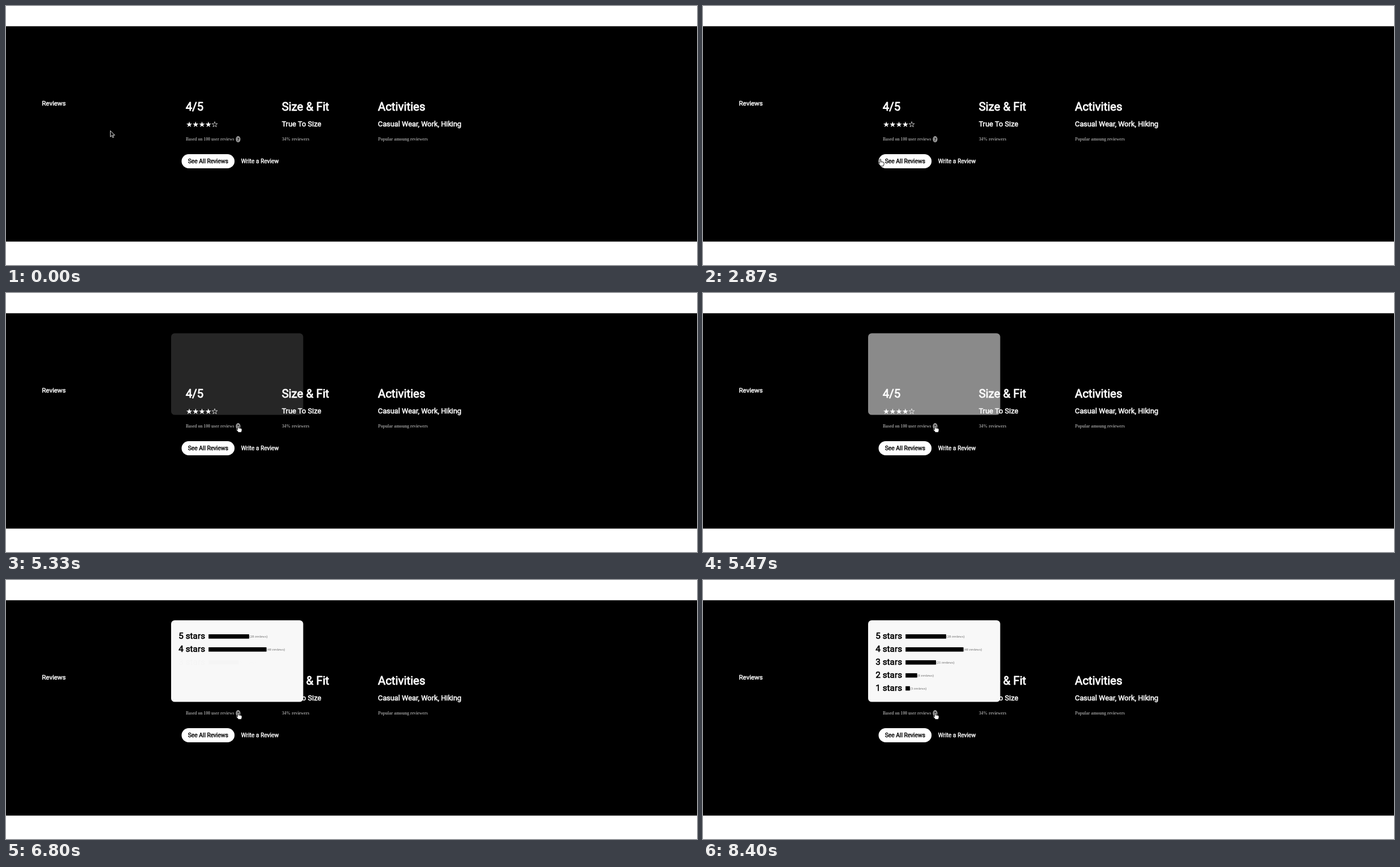
Recreate the animation shown at these times as an HTML page with a canvas. Size 1222 by 458 pixels, loop 9590 ms.

```html
<!DOCTYPE html>
<html lang="en">
<head>
<meta charset="utf-8">
<title>Reviews</title>
<style>
html, body { margin: 0; width: 100%; height: 100%; overflow: hidden; background: #fff; }
canvas { display: block; width: 1222px; height: 458px; }
</style>
</head>
<body>
<canvas id="stage"></canvas>
<script>
const W = 1222, H = 458, LOOP = 9590, FPS = 15;
const GREY = '#929292';
const canvas = document.getElementById('stage');
const ctx = canvas.getContext('2d');
const dpr = window.devicePixelRatio || 1;
canvas.width = W * dpr;
canvas.height = H * dpr;

// Pointer path: time, x, y
const path = [
  [0, 184.5, 220.5], [930, 184.5, 220.5], [1000, 185.5, 219.8], [1200, 185.5, 219.8],
  [1500, 203, 198], [1800, 224, 189.5], [2200, 235.5, 211.5], [2600, 275, 248],
  [2867, 313.5, 271], [3133, 357, 271], [3530, 357, 271],
  [4467, 392.8, 248.8], [4600, 393.5, 248.5], [5200, 410.6, 234.4], [LOOP, 410.6, 234.4]
];
const button = { x: 310.5, y: 262, w: 93.7, h: 25 };
const columns = [
  [317.8, '4/5', '', 'Based on 100 user reviews'],
  [487.7, 'Size & Fit', 'True To Size', '34% reviewers'],
  [657.8, 'Activities', 'Casual Wear, Work, Hiking', 'Popular amoung reviewers']
];
const counts = [28, 40, 21, 8, 3];

const clamp = v => Math.min(1, Math.max(0, v));
const ease = v => { v = clamp(v); return v * v * (3 - 2 * v); };
const fade = (t, start, length) => ease((t - start) / length);

function pointerAt(t) {
  const i = path.findIndex((p, n) => n > 0 && t <= p[0]);
  const [t0, x0, y0] = path[i - 1], [t1, x1, y1] = path[i];
  const k = (t - t0) / (t1 - t0);
  return [x0 + (x1 - x0) * k, y0 + (y1 - y0) * k];
}

// Regular weight thickened by a thin outline
function heavy(text, x, y, size, color) {
  ctx.font = `400 ${size}px Roboto, sans-serif`;
  ctx.fillStyle = ctx.strokeStyle = color;
  ctx.lineWidth = size * 0.04;
  ctx.lineJoin = 'round';
  ctx.fillText(text, x, y);
  ctx.strokeText(text, x, y);
}

function serif(text, x, y, size, color = GREY) {
  ctx.font = `700 ${size}px "Liberation Serif", serif`;
  ctx.fillStyle = color;
  ctx.fillText(text, x, y);
}

function box(x, y, w, h, r, color) {
  ctx.fillStyle = color;
  ctx.beginPath();
  ctx.roundRect(x, y, w, h, r);
  ctx.fill();
}

function star(cx, cy, r, filled) {
  ctx.beginPath();
  for (let i = 0; i < 10; i++) {
    const a = i * Math.PI / 5 - Math.PI / 2, d = i % 2 ? r * 0.39 : r;
    ctx.lineTo(cx + d * Math.cos(a), cy + d * Math.sin(a));
  }
  ctx.closePath();
  ctx.lineWidth = 0.7;
  ctx.lineJoin = 'miter';
  ctx.fillStyle = ctx.strokeStyle = '#fff';
  filled ? ctx.fill() : ctx.stroke();
}

function drawPage(scale) {
  ctx.fillStyle = '#fff';
  ctx.fillRect(0, 0, W, H);
  ctx.fillStyle = '#000';
  ctx.fillRect(0, 35.8, W, 380.8);
  heavy('Reviews', 63.5, 176.2, 11.52, '#fff');
  for (const [x, title, detail, note] of columns) {
    heavy(title, x, 184.6, 20.48, '#fff');
    heavy(detail, x, 213.2, 12.8, '#fff');
    serif(note, x + 0.2, 238, 7.68);
  }
  for (let i = 0; i < 5; i++) star(324.1 + i * 11.25, 209.6, i < 4 ? 5.4 : 5.1, i < 4);

  ctx.fillStyle = '#999';
  ctx.beginPath();
  ctx.ellipse(410.5, 235.6, 4.1, 5.5, 0, 0, Math.PI * 2);
  ctx.fill();
  ctx.textAlign = 'center';
  serif('?', 410.5, 238.7, 9, '#000');

  const { x, y, w, h } = button, cx = x + w / 2, cy = y + h / 2;
  ctx.save();
  ctx.translate(cx, cy);
  ctx.scale(scale, scale);
  box(-w / 2, -h / 2, w, h, h / 2, '#fff');
  heavy('See All Reviews', 0, 3.5, 10.24, '#000');
  ctx.restore();
  ctx.textAlign = 'left';
  heavy('Write a Review', 415.8, 278, 10.24, '#fff');
}

function drawCard(t) {
  ctx.globalAlpha = fade(t, 5219, 461);
  box(292, 71.2, 233.6, 144.4, 6.4, '#f8f8f8');
  counts.forEach((count, i) => {
    const y = 104.2 + i * 22.95, w = count * 2.56;
    ctx.globalAlpha = fade(t, 5770 + i * 500, 500);
    heavy(`${5 - i} stars`, 305.2, y, 15.36, '#000');
    ctx.fillStyle = '#000';
    ctx.fillRect(358.2, y - 8.2, w, 7.7);
    serif(`(${count} reviews)`, 358.2 + w, y - 2.4, 6.4);
  });
  ctx.globalAlpha = 1;
}

function drawArrow() {
  const shape = new Path2D('M0 0V10.9L2.6 8.5L4.3 12.3L6 11.5L4.4 7.9H7.9Z');
  ctx.lineWidth = 0.9;
  ctx.lineJoin = 'miter';
  ctx.fillStyle = '#181818';
  ctx.strokeStyle = '#e8e8e8';
  ctx.fill(shape);
  ctx.stroke(shape);
}

function drawHand() {
  const shape = new Path2D('M-1.1 .9Q-1.1 -.2 0 -.2T1.1 .9V4.2Q2.2 3.6 3 4.6Q4.2 4.1 4.9 5.1Q6.6 4.8 6.6 6.5V8.6Q6.4 10 5.5 12H.2Q-.6 10.2 -3.3 7.6Q-3.7 6.2 -2.5 6.2L-1.1 7.4Z');
  ctx.lineWidth = 0.9;
  ctx.lineJoin = 'round';
  ctx.fillStyle = '#fff';
  ctx.strokeStyle = '#000';
  ctx.fill(shape);
  ctx.stroke(shape);
  ctx.lineWidth = 0.4;
  ctx.stroke(new Path2D('M1.1 4.2V6.2M3 4.6V6.2M4.9 5.1V6.4'));
}

function drawPointer(t) {
  const [x, y] = pointerAt(t);
  const inside = (bx, by, w, h) => x > bx && x < bx + w && y > by && y < by + h;
  const onLink = inside(button.x, button.y, button.w, button.h) || inside(406, 230, 9, 11);
  ctx.save();
  ctx.translate(x, y);
  onLink ? drawHand() : drawArrow();
  ctx.restore();
}

function draw(now) {
  const t = Math.floor((now % LOOP + 7) * FPS / 1000) * 1000 / FPS;
  const shown = Math.min(t, LOOP);
  const scale = 1 + 0.05 * (fade(shown, 2860, 270) - fade(shown, 3920, 300));
  ctx.setTransform(dpr, 0, 0, dpr, 0, 0);
  drawPage(scale);
  drawCard(shown);
  drawPointer(shown);
}

const start = performance.now();
function tick() {
  draw(performance.now() - start);
  requestAnimationFrame(tick);
}
tick();
</script>
</body>
</html>
```
